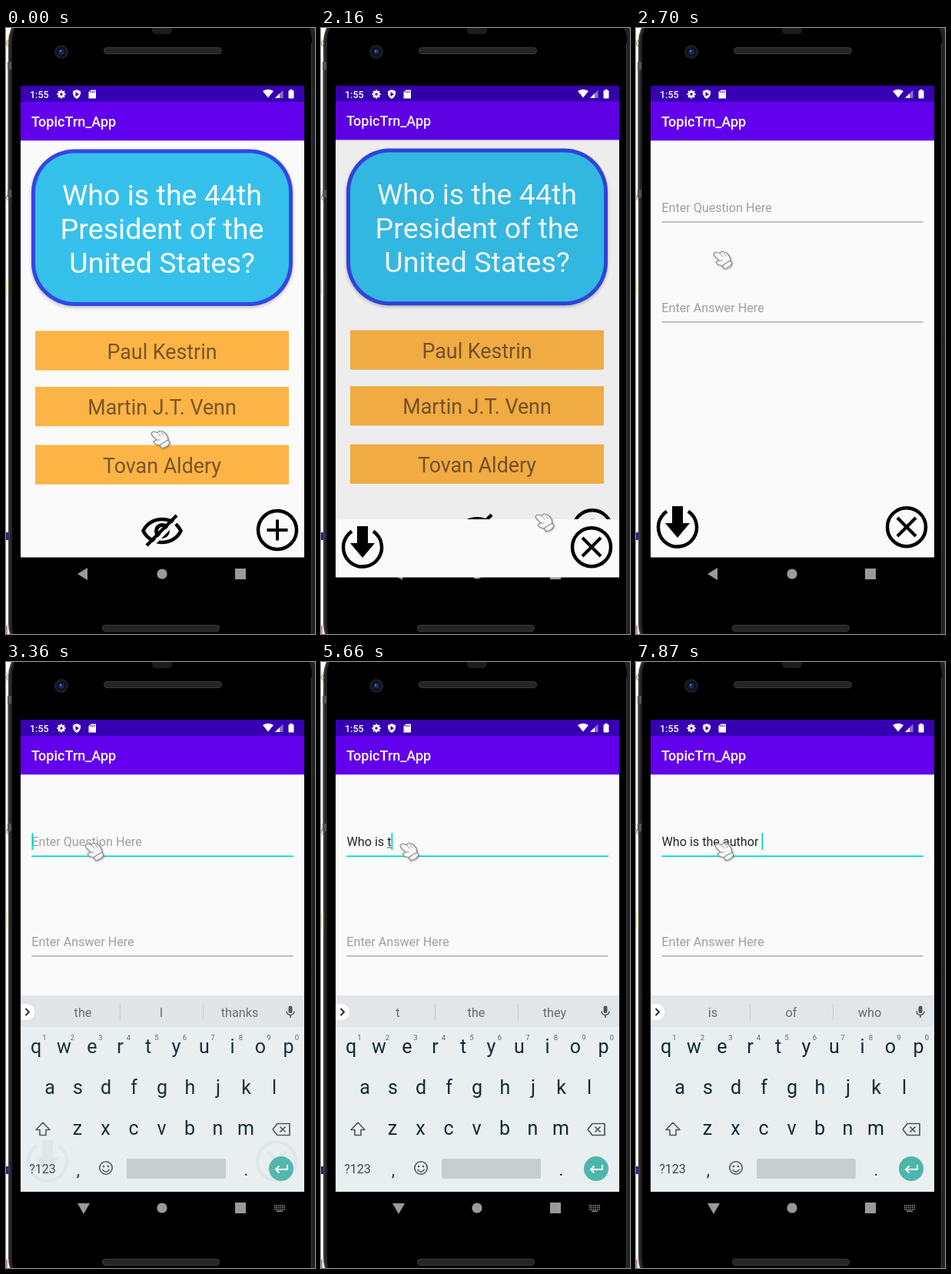
These frames come from a looping animation (402 px wide and 787 px high, 8 s). An HTML page with a canvas:

```html
<!DOCTYPE html>
<html lang="en">
<head>
<meta charset="utf-8">
<title>Flash card demo</title>
<style>
html, body { margin: 0; width: 100%; height: 100%; overflow: hidden; background: #fff; }
canvas { display: block; width: 402px; height: 787px; }
</style>
</head>
<body>
<canvas id="stage" width="402" height="787"></canvas>
<script>
const ctx = document.getElementById('stage').getContext('2d');
const LOOP = 8000;
const SCREEN = { x: 19, y: 75, w: 369, h: 612.5 };
const TEAL = '#03dac5';

// [time, x, y] of the pointer's top left corner
const pointer = [
  [0, 187, 521], [500, 190, 529], [650, 222, 552], [770, 292, 606], [890, 342, 648],
  [1040, 355, 653], [1160, 362, 656], [2160, 277, 629], [2310, 205, 548], [2460, 142, 412],
  [2580, 108, 322], [2700, 99, 288], [2820, 100, 250], [2940, 101, 233]
];

// [time, progress of the screen change]
const slide = [[0, 0], [2160, 0.07], [2310, 0.7], [2460, 0.97], [2580, 1]];
const fade = [[0, 0], [3360, 0.97], [3480, 0.985], [3600, 1]];

// [time, text, start of the underlined word, suggestions]
const typing = [
  [0, '', 0, 'the I thanks'],
  [4220, 'W', 0, 'W We What'],
  [4620, 'Wh', 0, 'Wh Who What'],
  [4870, 'Who', 0, "Who Whole Who's"],
  [5020, 'Who ', 4, 'is was are'],
  [5140, 'Who i', 4, "i is isn't"],
  [5420, 'Who is', 4, "is is isn't"],
  [5540, 'Who is ', 7, 'the a your'],
  [5660, 'Who is t', 7, 't the they'],
  [5970, 'Who is th', 7, 'th the they'],
  [6120, 'Who is the', 7, 'the they them'],
  [6240, 'Who is the ', 11, 'other best same'],
  [6520, 'Who is the a', 11, 'a address amount'],
  [6830, 'Who is the au', 11, 'au August automatic'],
  [6950, 'Who is the aut', 11, 'aut author authority'],
  [7200, 'Who is the auth', 11, 'auth author authority'],
  [7320, 'Who is the autho', 11, 'autho author authority'],
  [7720, 'Who is the author', 11, 'author authors authorities'],
  [7870, 'Who is the author ', 18, 'is of who']
];

function at(track, t) {
  let found = track[0];
  for (const step of track) if (step[0] <= t) found = step;
  return found;
}

function rect(x, y, w, h, color) {
  ctx.fillStyle = color;
  ctx.fillRect(x, y, w, h);
}

function round(x, y, w, h, r, color) {
  ctx.beginPath();
  ctx.roundRect(x, y, w, h, r);
  ctx.fillStyle = color;
  ctx.fill();
}

function disc(x, y, r, color) {
  ctx.beginPath();
  ctx.arc(x, y, r, 0, Math.PI * 2);
  ctx.fillStyle = color;
  ctx.fill();
}

function ring(x, y, r, color, width, from = 0, to = Math.PI * 2) {
  ctx.beginPath();
  ctx.arc(x, y, r, from, to);
  ctx.strokeStyle = color;
  ctx.lineWidth = width;
  ctx.stroke();
}

function trace(points) {
  ctx.beginPath();
  for (let i = 0; i < points.length; i += 2) ctx.lineTo(points[i], points[i + 1]);
}

function poly(points, color) {
  trace(points);
  ctx.closePath();
  ctx.fillStyle = color;
  ctx.fill();
}

function line(points, color, width) {
  trace(points);
  ctx.strokeStyle = color;
  ctx.lineWidth = width;
  ctx.stroke();
}

function label(text, x, y, size, color, align = 'left', weight = 400) {
  ctx.font = `${weight} ${size}px Roboto, sans-serif`;
  ctx.textAlign = align;
  ctx.fillStyle = color;
  ctx.fillText(text, x, y);
}

function speaker(x, y, w) {
  round(x, y, w, 9, 4.5, '#3a3a3a');
  round(x + 1, y + 1, w - 2, 7, 3.5, '#252525');
}

function phone() {
  rect(0, 0, 402, 787, '#fff');
  rect(0, 326, 2, 20, '#f3f3c0');
  rect(0, 655, 3, 10, '#3d1a8c');
  rect(0, 776, 2, 11, '#c98ba8');
  line([3, 16, 0, 20, 3, 24], '#c98a3a', 1.2);
  line([3, 216, 0, 220, 3, 224], '#c98a3a', 1.2);
  rect(2, 44, 3, 176, '#8a8a8a');
  round(3, -24, 403, 840, 42, '#3c3e3e');
  round(5, -22, 399, 836, 40, '#222424');
  rect(2, 44, 5, 10, '#555');
  rect(2, 210, 5, 10, '#555');
  round(8, -20, 390, 832, 36, '#000');
  line([397.5, 20, 397.5, 787], '#3c3e3e', 1);
  round(190, -6, 26, 14, 5, '#1c1c1c');
  speaker(127, 25, 154);
  speaker(125, 775, 153);
  disc(72, 31, 9, '#1e1f21');
  disc(72, 31, 6.5, '#0c1024');
  disc(72, 31, 3.5, '#1c2a55');
  disc(71, 30, 1.2, '#5d74b4');
}

function navBar(open) {
  const gray = '#9a9a9a';
  poly(open ? [93, 703, 109, 703, 101, 717] : [93, 709, 106, 701, 106, 717], gray);
  disc(203, 709, 6.6, gray);
  rect(298, 702, 14, 14, gray);
  if (!open) return;
  for (let row = 0; row < 3; row++)
    for (let i = 0; i < 6; i++) rect(349 + i * 2.5, 705 + row * 2.6, 1.5, 1.6, '#8c8c8c');
  rect(352, 712.5, 8, 1.5, '#8c8c8c');
}

function statusIcons() {
  const white = '#fff';
  label('1:55', 31, 90.5, 12.5, white, 'left', 500);
  for (let i = 0; i < 4; i++) {
    const c = Math.cos(i * Math.PI / 4) * 5.6, s = Math.sin(i * Math.PI / 4) * 5.6;
    line([72 - c, 86 - s, 72 + c, 86 + s], white, 2.3);
  }
  ring(72, 86, 3.1, white, 2.5);
  disc(72, 86, 1.7, '#3700b3');
  poly([92, 80, 97, 82, 97, 86, 95, 90, 92, 92, 89, 90, 87, 86, 87, 82], white);
  poly([90.5, 83, 95, 86, 90.5, 89], '#3700b3');
  poly([110.5, 80.5, 117, 80.5, 117, 91.5, 107.5, 91.5, 107.5, 83.5], white);
  for (let i = 0; i < 3; i++) rect(110 + i * 2.2, 82, 1, 2.2, '#3700b3');
  ctx.beginPath();
  ctx.moveTo(341, 90.5);
  ctx.lineTo(334, 82);
  ctx.quadraticCurveTo(341, 77.5, 348, 82);
  ctx.fillStyle = white;
  ctx.fill();
  poly([350, 91, 360.5, 91, 360.5, 80.5], '#8d6bd2');
  poly([350, 91, 356, 91, 356, 85], white);
  round(367.5, 81, 7, 10.5, 1, white);
  rect(369.5, 79.7, 3, 2, white);
}

function appBar() {
  rect(19, 96, 369, 50.3, '#6200ee');
  rect(19, 146.3, 369, 1, '#dcdcdf');
  label('TopicTrn_App', 33, 128, 18, '#fff', 'left', 500);
}

function eye() {
  ctx.strokeStyle = '#000';
  ctx.lineWidth = 4.5;
  ctx.beginPath();
  ctx.moveTo(178.5, 653);
  ctx.bezierCurveTo(188, 633, 218, 633, 227.5, 653);
  ctx.bezierCurveTo(218, 673, 188, 673, 178.5, 653);
  ctx.closePath();
  ctx.stroke();
  ring(203, 653, 7.5, '#000', 5);
  line([186, 676, 226, 636], '#fafafa', 4);
  line([183, 672, 222, 633], '#000', 4.5);
}

function home() {
  rect(19, 146, 369, 542, '#fafafa');
  appBar();
  ctx.save();
  ctx.shadowColor = 'rgba(0,0,0,.25)';
  ctx.shadowBlur = 4;
  ctx.shadowOffsetY = 2;
  round(33, 157.4, 340, 203.6, 56, '#3346e6');
  ctx.restore();
  round(38, 162.4, 330, 193.6, 51, '#35c1ec');
  ['Who is the 44th', 'President of the', 'United States?'].forEach((s, i) =>
    label(s, 203, 229.7 + i * 44.06, 37.6, '#fff', 'center'));
  ['Paul Kestrin', 'Martin J.T. Venn', 'Tovan Aldery'].forEach((s, i) => {
    const y = [393.4, 466, 541.5][i];
    rect(38, y, 330, 51.2, '#fdb447');
    label(s, 203, y + 36.2, 26.8, '#7a5526', 'center');
  });
  eye();
  ring(353, 652, 25, '#000', 4.5);
  line([339.5, 652, 366.5, 652], '#000', 4);
  line([353, 638.5, 353, 665.5], '#000', 4);
}

function field(hint, base, focus) {
  label(hint, 33.3, base, 16.15, '#9f9f9f');
  if (focus) rect(33.5, base + 12, 340.5, 1.8, TEAL);
  else rect(33.5, base + 12, 340, 1, '#868686');
}

function form(t) {
  const [, text, start] = at(typing, t);
  const focus = t >= 3090;
  rect(19, 75, 369, 21, '#3700b3');
  rect(19, 146, 369, 542, '#fafafa');
  appBar();
  field(text ? '' : 'Enter Question Here', 239.4, focus);
  field('Enter Answer Here', 369.4, false);
  if (text) {
    label(text, 33.5, 239.4, 16.15, '#262626');
    const from = 33.5 + ctx.measureText(text.slice(0, start)).width;
    const end = 33.5 + ctx.measureText(text).width;
    if (start < text.length) rect(from, 240.5, end - from, 1, '#444');
    rect(end, 222, 1.8, 22, TEAL);
  } else if (focus && t < 3600) {
    rect(33.5, 222, 1.8, 22, TEAL);
  }
  ring(54, 648.5, 25, '#000', 4.5, -0.98, Math.PI + 0.98);
  poly([47, 621, 61, 621, 61, 643, 70, 643, 54, 662, 38, 643, 47, 643], '#000');
  ring(352, 648.2, 25, '#000', 4.5);
  line([340, 636, 364, 660], '#000', 4);
  line([364, 636, 340, 660], '#000', 4);
}

function keyRow(keys, x, y) {
  [...keys].forEach((k, i) => label(k, x + i * 36.5, y, 25, '#0e2a36', 'center'));
}

function keyboard(t) {
  const ink = '#4a565c';
  ctx.save();
  ctx.globalAlpha = at(fade, t)[1];
  rect(19, 434, 369, 254, '#e9eef1');
  rect(19, 433, 369, 41, '#e2e6e8');
  round(19, 444, 18, 21, [0, 10, 10, 0], '#fff');
  line([25.5, 450, 30, 454.5, 25.5, 459], '#222', 1.8);
  rect(148, 444, 1, 21, '#c3c9cc');
  rect(256, 444, 1, 21, '#c3c9cc');
  at(typing, t)[3].split(' ').forEach((s, i) => label(s, 100 + i * 102, 460.5, 16.2, '#626c71', 'center'));
  round(367.5, 446.5, 5, 9.5, 2.5, ink);
  ring(370, 453.5, 5, ink, 1.5, 0, Math.PI);
  line([370, 458.5, 370, 462], ink, 1.6);

  keyRow('qwertyuiop', 39, 508.4);
  keyRow('asdfghjkl', 57, 561);
  keyRow('zxcvbnm', 93, 614);
  [...'1234567890'].forEach((d, i) => label(d, 50 + i * 36.5, 490.5, 9.5, '#5d686d', 'center'));
  ctx.lineJoin = 'round';
  line([48, 598, 57, 607.5, 52, 607.5, 52, 614.5, 44, 614.5, 44, 607.5, 39, 607.5, 48, 598], ink, 1.6);
  line([347, 607, 353, 599.5, 369, 599.5, 369, 614.5, 353, 614.5, 347, 607], ink, 1.7);
  line([356.5, 603.5, 363.5, 610.5], ink, 1.7);
  line([363.5, 603.5, 356.5, 610.5], ink, 1.7);
  label('?123', 47.5, 663.5, 16, '#36464d', 'center');
  label(',', 94, 667, 22, '#263238', 'center');
  label('.', 312.5, 667, 22, '#263238', 'center');
  ring(130, 657, 8.2, ink, 1.6);
  disc(127, 655, 1.3, ink);
  disc(133, 655, 1.3, ink);
  ring(130, 657.5, 4.5, ink, 1.5, 0.25, Math.PI - 0.25);
  round(157, 645, 129, 26, 2, '#c8cdd0');
  disc(358, 658, 16, '#4db6ac');
  line([366, 653, 366, 659, 351, 659], '#fff', 1.9);
  line([355.5, 654.5, 351, 659, 355.5, 663.5], '#fff', 1.9);
  ctx.restore();
}

function hand(x, y) {
  const glove = [2, 5, 5, 3, 10, 4.5, 13, 2, 19, 4, 23, 9, 24, 14, 26, 18,
    23, 22, 16, 25, 13, 21, 7, 19, 5, 16, 9, 14, 3, 8, 2, 5];
  ctx.save();
  ctx.translate(x, y);
  ctx.lineCap = ctx.lineJoin = 'round';
  ctx.save();
  ctx.shadowColor = 'rgba(0,0,0,.4)';
  ctx.shadowBlur = 3;
  ctx.shadowOffsetX = ctx.shadowOffsetY = 1;
  poly(glove, '#f8f8f8');
  ctx.restore();
  line(glove, '#8f8f8f', 1.3);
  line([10, 4.5, 14, 9], '#999', 1);
  line([15, 4, 18, 8], '#999', 1);
  line([9, 14, 13, 14], '#999', 1);
  line([13, 21, 17, 18, 24, 14], '#888', 1.1);
  ctx.restore();
}

function clipTo(x, y, w, h) {
  ctx.beginPath();
  ctx.rect(x, y, w, h);
  ctx.clip();
}

function draw(t) {
  const p = at(slide, t)[1];
  const { x, y, w, h } = SCREEN;
  phone();
  navBar(t >= 3210);
  if (p < 1) {
    ctx.save();
    clipTo(x, y, w, h);
    rect(x, y, w, 21, '#3700b3');
    ctx.translate(0, -12 * p);
    home();
    ctx.restore();
    rect(x, y, w, h, `rgba(0,0,0,${p && Math.min(0.1, 0.045 + p * 0.07)})`);
  }
  if (p > 0) {
    // the form is revealed from its bottom edge while it rises
    const shift = Math.round(27.5 * (1 - p));
    const top = Math.round(577 * (1 - p));
    ctx.save();
    ctx.translate(0, shift);
    clipTo(x, y + top, w, h - top);
    form(t);
    ctx.restore();
  }
  if (t >= 3360) keyboard(t);
  statusIcons();
  const [, px, py] = at(pointer, t);
  hand(px, py);
}

const begin = performance.now();
function frame() {
  draw((performance.now() - begin) % LOOP);
  requestAnimationFrame(frame);
}
frame();
</script>
</body>
</html>
```
